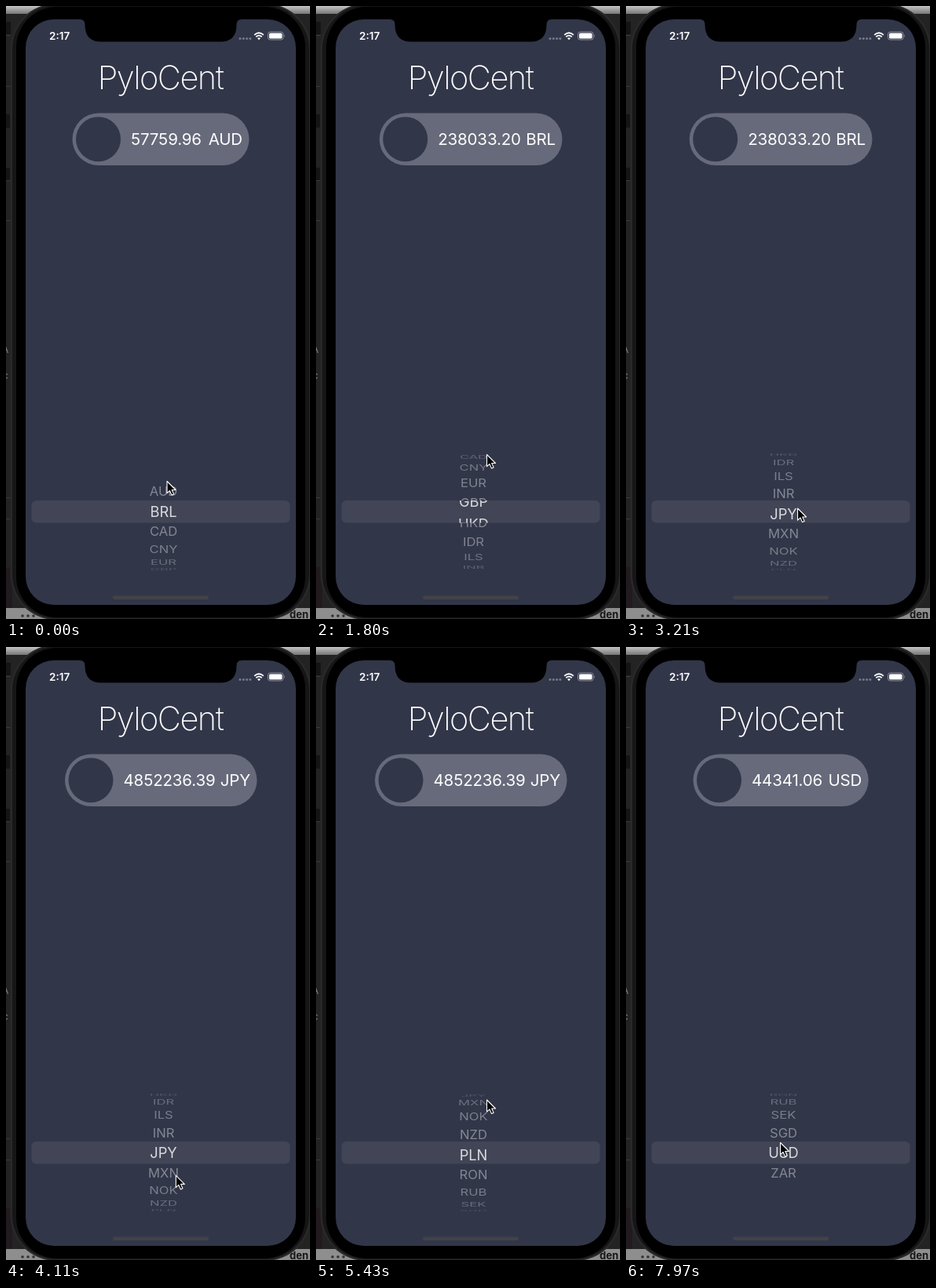
An HTML page that plays this animation: 387x781 px, repeating every 7990 ms.

```html
<!DOCTYPE html>
<html lang="en">
<head>
<meta charset="utf-8">
<title>Currency picker</title>
<style>
  html, body { margin: 0; width: 100%; height: 100%; overflow: hidden; background: #222; }
  svg { display: block; width: 387px; height: 781px; font-family: Inter, Roboto, sans-serif; }
</style>
</head>
<body>
<svg viewBox="0 0 387 781" xmlns="http://www.w3.org/2000/svg">
  <defs>
    <linearGradient id="topBar" x2="0" y2="1">
      <stop offset="0" stop-color="#c4c4c4"/><stop offset="1" stop-color="#777"/>
    </linearGradient>
    <clipPath id="lensClip"><rect x="33" y="630" width="329" height="28.5"/></clipPath>
    <clipPath id="rowClip"><path d="M25 560H369V630H25ZM25 658.5H369V730H25Z"/></clipPath>
  </defs>

  <!-- desktop behind the phone -->
  <rect width="387" height="781" fill="#232324"/>
  <rect width="387" height="10" fill="url(#topBar)"/>
  <path d="M0 37.500H6M0 102.500H6M0 138.500H6M0 222.500H6M0 273.500H6M0 626.500H6M0 653.500H6" stroke="#3b3b3c"/>
  <path d="M0 20H6V36H0ZM0 138H5V155H0ZM0 206H5V222H0Z" fill="#141415"/>
  <g font-size="12" fill="#8b8b8c">
    <text x="-5" y="442">A</text>
    <text x="-4" y="475">c</text>
  </g>
  <rect y="715" width="8" height="52" fill="#211a1f"/>
  <rect y="767" width="387" height="14" fill="#8e8e8e"/>
  <g fill="#333"><circle cx="21" cy="777" r="1.800"/><circle cx="28" cy="777" r="1.800"/><circle cx="35" cy="777" r="1.800"/></g>
  <text x="361" y="780" font-size="13" font-weight="700" fill="#161616">den</text>

  <!-- phone -->
  <rect x="5.500" y="-3" width="383" height="785" rx="58" fill="#29292a"/>
  <rect x="8" y="-1" width="378" height="781" rx="56" fill="#161617"/>
  <rect x="13" y="1" width="368" height="778" rx="52" fill="#000"/>
  <rect x="25" y="17" width="344" height="746" rx="36" fill="#323649"/>
  <path d="M94 16.500H300V17Q293.500 17 293.500 24Q293.500 45.500 273 45.500H121Q100.500 45.500 100.500 24Q100.500 17 94 17Z" fill="#000"/>

  <!-- status bar -->
  <text x="55" y="43" font-size="13.500" font-weight="600" fill="#fff">2:17</text>
  <g fill="#777a87">
    <circle cx="298" cy="41.500" r="1.500"/><circle cx="302.300" cy="41.500" r="1.500"/>
    <circle cx="306.600" cy="41.500" r="1.500"/><circle cx="310.900" cy="41.500" r="1.500"/>
  </g>
  <g fill="none" stroke="#fff" stroke-width="1.800">
    <path d="M316.200 36.900Q322 31.500 327.800 36.900"/>
    <path d="M318.300 39.200Q322 36 325.700 39.200"/>
  </g>
  <path d="M320 41Q322 39.300 324 41L322 43.200Z" fill="#fff"/>
  <rect x="333.500" y="33" width="19.500" height="10" rx="2.800" fill="none" stroke="#8c8e99" stroke-width="1"/>
  <rect x="335" y="34.500" width="16.500" height="7" rx="1.500" fill="#fff"/>
  <path d="M354.200 36.300Q356 38 354.200 39.700Z" fill="#8c8e99"/>

  <text x="196.500" y="106" text-anchor="middle" font-size="41.500" font-weight="200" letter-spacing="-1.500" fill="#fff">PyloCent</text>

  <!-- price -->
  <rect id="pill" y="136.500" height="66.500" rx="33.250" fill="#676a7a"/>
  <circle id="badge" cy="169.700" r="28.500" fill="#323649"/>
  <g font-size="20.500" letter-spacing="-.150" fill="#fff">
    <text id="price" y="177"/>
    <text id="unit" y="177" text-anchor="end"/>
  </g>

  <!-- wheel -->
  <rect x="32.500" y="630" width="329" height="28.500" rx="6" fill="#414556"/>
  <g id="rows" clip-path="url(#rowClip)"/>
  <g id="lens" clip-path="url(#lensClip)"/>

  <rect x="136" y="751.500" width="122" height="4.500" rx="2.250" fill="#424348"/>
  <path id="cursor" d="M0 0V15.200L3.500 12L6 17.600L8.600 16.400L6.200 11H11Z" fill="#000" stroke="#fff" stroke-width="1.100" stroke-linejoin="round"/>
</svg>
<script>
const LOOP = 7990;
const CODES = 'AUD BRL CAD CNY EUR GBP HKD IDR ILS INR JPY MXN NOK NZD PLN RON RUB SEK SGD USD ZAR'.split(' ');
const MID = 644.5, RADIUS = 74.5, STEP = Math.PI / 9, ZOOM = 1.1;

// time, price, unit, left edge, right edge
const PRICES = [
  [0, '57759.96', 'AUD', 84.5, 309.5],
  [540, '238033.20', 'BRL', 80.7, 313.5],
  [3720, '4852236.39', 'JPY', 75, 319.5],
  [5800, '165633.31', 'PLN', 82.8, 311.8],
  [7460, '44341.06', 'USD', 85.5, 308.7]
];

const linear = u => u;
const smooth = u => u * u * (3 - 2 * u);
const out = u => 1 - (1 - u) ** 3;

// start, end, easing, value(s) reached; held in between
const WHEEL = [
  [60, 120, out, 1], [1200, 1430, smooth, 1.9], [1490, 1800, linear, 5.44],
  [1800, 2480, out, 9.62], [3150, 3330, out, 10],
  [4680, 4900, smooth, 10.95], [4900, 5260, smooth, 13.55], [5360, 5530, out, 14],
  [6400, 6590, linear, 17.44], [6590, 6700, out, 18.8], [6950, 7070, out, 19]
];
const POINTER = [
  [690, 1150, smooth, 213, 686], [1200, 1430, smooth, 214, 663], [1490, 1800, linear, 217.5, 571.5],
  [1860, 2440, smooth, 221, 646], [2860, 2980, smooth, 218.5, 640],
  [4010, 4200, smooth, 214.5, 701], [4500, 4900, smooth, 210.5, 643], [4900, 5260, smooth, 217.5, 577],
  [5800, 6070, smooth, 224, 686], [6390, 6590, linear, 227.5, 566], [6590, 6700, out, 227, 550],
  [7460, 7620, smooth, 205, 653.5], [7910, 7970, smooth, 196.5, 631.5]
];

function track(start, moves, t) {
  let now = start;
  for (const [a, b, ease, ...goal] of moves) {
    if (t < a) break;
    const u = ease(Math.min(1, (t - a) / (b - a)));
    now = now.map((v, i) => v + (goal[i] - v) * u);
  }
  return now;
}

const el = id => document.getElementById(id);
const set = (node, attrs) => { for (const k in attrs) node.setAttribute(k, attrs[k]); };

function addRow(parent, code, size, y, fill) {
  const node = document.createElementNS('http://www.w3.org/2000/svg', 'text');
  set(node, { 'text-anchor': 'middle', 'font-size': size, y, fill });
  node.textContent = code;
  el(parent).append(node);
  return node;
}
const rows = CODES.map(c => addRow('rows', c, 16.6, 6, '#fff'));
const lens = CODES.map(c => addRow('lens', c, 16.6 * ZOOM, 6 * ZOOM, '#d9dade'));

function drawWheel(pos) {
  CODES.forEach((_, i) => {
    const angle = (i - pos) * STEP;
    const shown = Math.abs(angle) < Math.PI / 2;
    const near = Math.abs(angle) < STEP * 1.5;
    const dy = RADIUS * Math.sin(angle), squash = Math.max(.01, Math.cos(angle));
    set(rows[i], {
      display: shown ? 'inline' : 'none',
      opacity: .42 * squash ** .6,
      transform: `translate(200.5 ${MID + dy}) scale(1 ${squash})`
    });
    set(lens[i], {
      display: near ? 'inline' : 'none',
      transform: `translate(200.5 ${MID + dy * ZOOM}) scale(1 ${squash})`
    });
  });
}

function drawPrice(t) {
  const [, price, unit, left, right] = PRICES.filter(p => p[0] <= t).pop();
  set(el('pill'), { x: left, width: right - left });
  set(el('badge'), { cx: left + 33 });
  set(el('price'), { x: left + 74.5 });
  set(el('unit'), { x: right - 8.5 });
  el('price').textContent = price;
  el('unit').textContent = unit;
}

function draw(t) {
  drawPrice(t);
  drawWheel(track([1.02], WHEEL, t)[0]);
  const [x, y] = track([205, 605.5], POINTER, t);
  set(el('cursor'), { transform: `translate(${x} ${y})` });
}

function tick() {
  draw(performance.now() % LOOP);
  requestAnimationFrame(tick);
}
tick();
</script>
</body>
</html>
```
